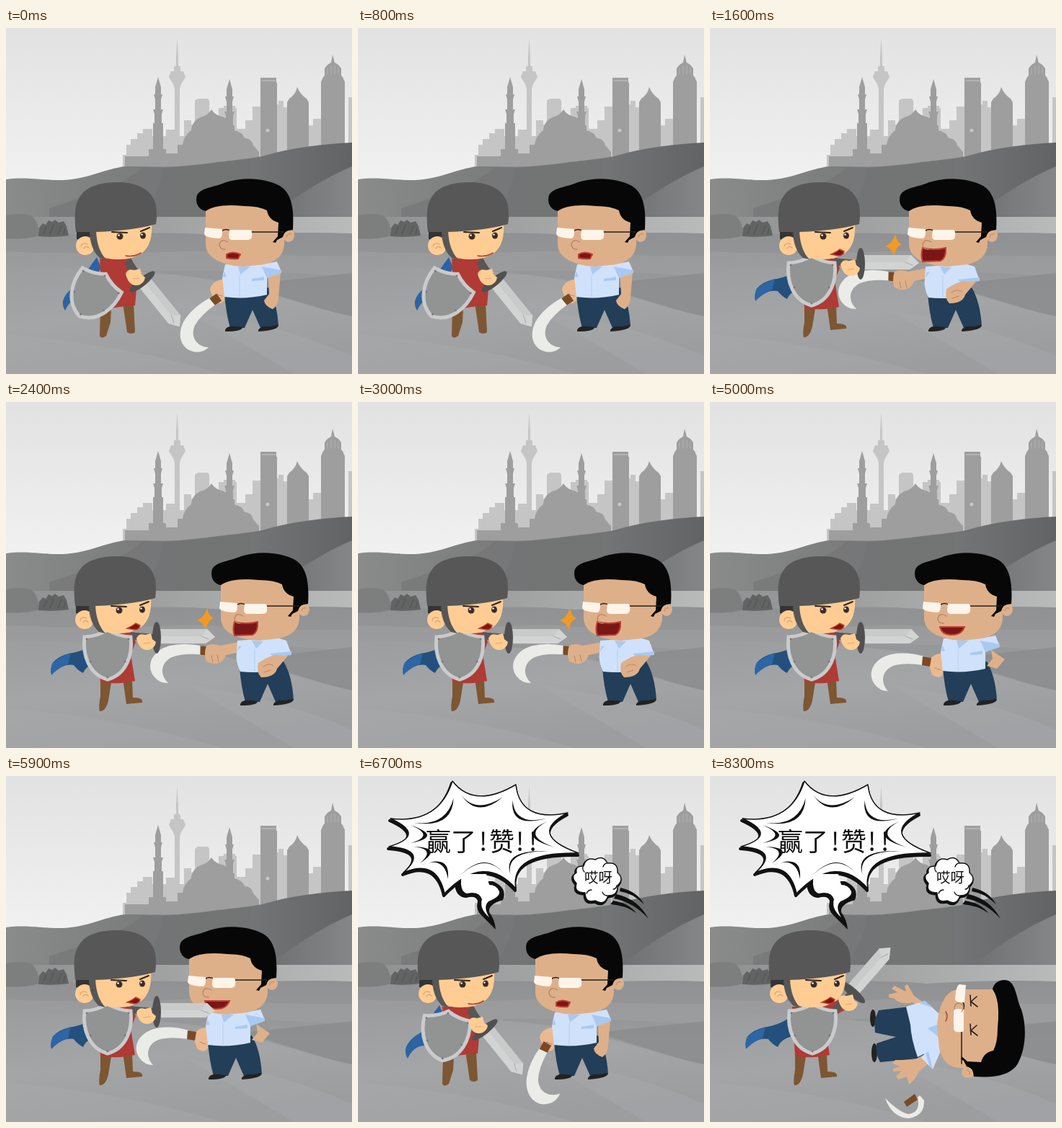
An HTML page for the animation above (8.5 s loop, 480 by 480 pixels).

```html
<!DOCTYPE html>
<html lang="zh">
<head>
<meta charset="utf-8">
<style>
html, body { margin: 0; width: 100%; height: 100%; overflow: hidden; background: #ececec; }
svg { display: block; width: 100vw; height: 100vh; }
text { font-family: "Noto Sans CJK SC", "Noto Sans CJK", sans-serif; font-weight: 500; fill: #111; }
</style>
</head>
<body>
<svg viewBox="0 0 480 480">
  <defs>
    <linearGradient id="sky" x2="0" y2="1"><stop stop-color="#e2e2e2"/><stop offset="1" stop-color="#f1f1f1"/></linearGradient>
    <linearGradient id="hill"><stop stop-color="#8a8b8b"/><stop offset=".35" stop-color="#7c7d7d"/><stop offset=".7" stop-color="#747576"/><stop offset="1" stop-color="#626364"/></linearGradient>
    <linearGradient id="slope"><stop stop-color="#6f7071"/><stop offset="1" stop-color="#858687"/></linearGradient>
    <linearGradient id="strip"><stop stop-color="#8e8f90"/><stop offset=".5" stop-color="#a2a3a3"/><stop offset="1" stop-color="#b9baba"/></linearGradient>
    <linearGradient id="field" x2="0" y2="1"><stop stop-color="#909192"/><stop offset=".5" stop-color="#9b9c9e"/><stop offset="1" stop-color="#848587"/></linearGradient>
    <linearGradient id="mound" x2=".4" y2="1"><stop stop-color="#9c9d9f"/><stop offset=".5" stop-color="#a4a5a7"/><stop offset="1" stop-color="#9c9d9f"/></linearGradient>
  </defs>
  <g id="scene"></g>
  <g id="man"></g>
  <g id="warrior"></g>
  <g id="bubbles"></g>
</svg>
<script>
const LOOP = 8500;
const layer = id => document.getElementById(id);
const p = (d, fill, extra = "") => `<path d="${d}" fill="${fill}" ${extra}/>`;
const line = (d, color, w = 1.5) => p(d, "none", `stroke="${color}" stroke-width="${w}" stroke-linecap="round" stroke-linejoin="round"`);
const oval = (x, y, rx, ry, fill) => `<ellipse cx="${x}" cy="${y}" rx="${rx}" ry="${ry}" fill="${fill}"/>`;
const group = (transform, ...parts) => `<g transform="${transform}">${parts.join("")}</g>`;
const move = (x, ...parts) => group(`translate(${x})`, ...parts);

const STEEL = "#575757", SKIN = "#ffcd93", RED = "#b03a35", BROWN = "#7d5632";
const TAN = "#deb08a", NAVY = "#223e58", SHIRT = "#d0e2fb", FOLD = "#a9c9f2", LENS = "#fdf4ea";

// ---------- scenery ----------
function minaret(x, top) {
  return p(`M${x} ${top}L${x + 4} ${top + 14}V${top + 24}H${x + 6}L${x + 4} ${top + 31}V${top + 45}H${x + 7}L${x + 5} ${top + 51}V${top + 64}H${x + 7}V${top + 125}H${x - 7}V${top + 64}H${x - 5}V${top + 51}L${x - 7} ${top + 45}H${x - 4}V${top + 31}L${x - 6} ${top + 24}H${x - 4}V${top + 14}Z`, "#9e9e9e");
}

function scenery() {
  const far = "#c5c5c5", near = "#9e9e9e";
  return `<rect width="480" height="215" fill="url(#sky)"/>` +
    p("M162 195V176H167V162H173V154H182V146H190V140H203V150H222V141H234V150H247V128H257V134H262V101L266 98H280L282 101V195Z", far) +
    p("M295 195V111H302V108H318V111H320V140H332V128H342V109H353V106H378V101H385V110H390V195ZM420 195V135H426V126H437V195ZM475 195V96H480V195Z", far) +
    p("M237.500 14L239 40V52L242 54V60H246L249 68L243 78L241 84V195H234V84L232 78L226 68L229 60H233V54L236 52V40Z", far) +
    p("M165 195V178H198V168H222V174H238V162H245Q246 150 257 142Q258 128 272 123Q280 121 285 113Q290 121 300 123Q314 128 316 142Q328 144 331 153Q340 152 343 163L351 172V195Z", near) +
    minaret(211, 68) + minaret(310, 71) +
    p("M353 195V69H375V76H376V195Z", near) + line("M355 73H374", "#c8c8c8", 1) + oval(363, 142, 2.5, 2.5, far) +
    p("M390 195V103L393 98Q402 92 404 82Q408 92 417 98L420 103V195Z", near) +
    p("M437 195V75L440 68L442 66V56L446 51L451 48L453 37L456 48L461 51L465 56V66L467 68L470 75V195Z", near) +
    line("M446 64V56M451 64V53M456 64V53M461 64V56", "#b3b3b3", 1) +
    p("M0 210C30 206 50 212 80 211C115 209 135 196 165 192C210 192 235 195 280 188C315 183 335 182 355 178C400 165 440 161 480 159V270H0Z", "url(#hill)") +
    p("M60 250C120 230 160 220 190 193C240 195 280 190 340 182V262H60Z", "#757677", 'opacity=".65"') +
    p("M190 263Q215 225 218 194L340 182V263Z", "#727374", 'opacity=".6"') +
    p("M364 262C400 235 440 209 480 192V264Z", "url(#slope)") +
    `<rect y="262" width="480" height="26" fill="url(#strip)"/>` +
    p("M0 286H130Q250 282 300 288Q400 282 480 285V480H0Z", "url(#field)") +
    p("M0 310Q140 316 260 309Q390 318 480 316V345Q300 330 0 342Z", "#a0a1a2", 'opacity=".6"') +
    p("M330 356L480 340V402Q390 375 330 356Z", "#898a8c", 'opacity=".7"') +
    p("M0 333C60 329 150 333 230 342C330 351 390 381 480 400V480H0Z", "url(#mound)") +
    p("M0 425Q170 440 300 480H0ZM250 392Q380 410 480 455V480H400Z", "#a7a8aa", 'opacity=".45"') +
    p("M0 260Q20 256 35 260Q46 270 46 288Q25 294 0 292Z", "#7d7e7e") +
    p("M45 289L46 277L51 271L55 273L59 267L64 269L68 266L73 270L80 268L84 275L87 288Q66 291 45 289Z", "#626363") +
    line("M52 285L56 276M61 286L66 273M72 286L77 274M80 286L82 278", "#4f5050", 1);
}

// ---------- warrior ----------
function shield(x, y, turn) {
  const d = "M0 -35Q-14 -26 -32 -25C-35 0 -26 27 0 34C26 27 35 0 32 -25Q14 -26 0 -35Z";
  const studs = [[0, -32], [-29, -22], [29, -22], [-24, 9], [24, 9], [0, 31]];
  return group(`translate(${x} ${y}) rotate(${turn})`,
    p(d, "#929493", 'stroke="#c9cbcc" stroke-width="5"'),
    ...studs.map(s => oval(s[0], s[1], 1.4, 1.4, "#777")));
}

function sword(x, y, turn) {
  return group(`translate(${x} ${y}) rotate(${turn})`,
    p("M-36 -8Q-20 -6 0 -5V4Q-20 4 -36 2Z", STEEL),
    p("M4 -12H70L81 -1L68 8H4Z", "#c9cbcb"),
    p("M4 -2H62L70 -12L81 -1L68 8H4Z", "#d2d3d3"),
    line("M62 -2L72 2", "#aaa", 1),
    oval(0, 0, 6, 22, "#505050"));
}

const fist = (x, y) => p(`M${x - 13} ${y - 4}Q${x - 10} ${y - 12} ${x - 1} ${y - 9}L${x + 7} ${y - 11}L${x + 9} ${y - 3}L${x + 14} ${y + 1}Q${x + 13} ${y + 10} ${x + 3} ${y + 12}Q${x - 9} ${y + 13} ${x - 13} ${y - 4}Z`, SKIN) +
  line(`M${x - 3} ${y + 3}L${x + 6} ${y + 2}`, "#dda56c", 1);

function warriorHead(shout) {
  return p("M98 280H124V298L98 293Z", "#343434") + oval(110, 302, 13, 13, SKIN) +
    line("M104 303Q105 297 113 300M108 306Q110 301 115 305", "#d69f68", 1.2) +
    p("M119 280L202 270Q204 299 190 311Q176 322 152 321Q126 320 119 298Z", SKIN) +
    p("M116 281H125Q126 308 139 321L130 319Q116 306 116 281Z", STEEL) +
    p("M97 283C95 262 94 245 104 232C113 219 133 214 155 214C182 214 203 224 208 246Q210 260 208 272Q166 284 97 283Z", STEEL) +
    line("M147 283L168 284M187 282L199 277", "#33241c", 2) +
    oval(158, 289, 4.5, 4.5, "#3b2c29") + oval(190, 288, 4, 4.5, "#3b2c29") +
    oval(156.5, 287.5, 1.3, 1.3, "#fff") + oval(188.500, 286.500, 1.2, 1.2, "#fff") +
    (shout ? p("M169 314Q176 311 181 307L187 310Q186 316 179 316Z", "#7c1717", 'stroke="#c9412f" stroke-width="1.5"')
           : line("M166 316Q178 318 187 312", "#b63f2c", 1.6));
}

function warrior(pose, x) {
  if (pose === "idle") {
    const back = x < 0;
    return move(x,
      p("M100 356Q82 366 79 379Q78 386 82 392Q90 374 106 374L132 333L126 318Q118 328 100 356Z", "#2b63a3"),
      p("M131 386L146 388L145 408L139 427Q132 432 130 427Z", BROWN),
      p("M162 381L177 382L179 422Q174 426 168 422Z", BROWN),
      p("M130 320L174 320L183 340L179 385Q158 386 134 391Z", RED),
      sword(189, 352, 51),
      shield(back ? 134 : 120, back ? 361 : 371, back ? 7 : 32),
      p("M165 327L178 330L182 340L172 342Z", STEEL),
      fist(179, 345),
      warriorHead(false));
  }
  const win = pose === "win", dx = win ? 14 : 0;
  return move(x,
    p("M130 330Q115 345 88 349Q72 353 66 362Q62 370 64 378Q80 362 95 365Q100 372 108 376Q114 362 135 360Z", "#23507d"),
    p("M91 348Q75 354 66 361Q62 369 64 379Q75 367 87 364Z", "#2d65a5"),
    p("M132 386L147 389L143 414Q139 430 131 429Q129 424 132 408Z", BROWN),
    p("M163 383L176 385L177 410Q192 410 190 417L168 419Z", BROWN),
    p("M128 320H176L181 333L174 350L180 387Q160 392 132 389Z", RED),
    win ? p("M170 320L194 310L202 324L178 337Z", RED) : "",
    win ? sword(212, 300, -49) : sword(210, 327, 0),
    shield(142 + dx, 351, 0),
    win ? fist(205, 314) : fist(195, 332),
    warriorHead(true));
}

// ---------- man ----------
const mouths = {
  idle: "M306 314Q314 309 325 314L322 320Q314 321 306 319Z",
  reach: "M299 312H333Q329 324 313 323Q301 322 299 312Z",
  strike: "M296 305Q312 309 328 305Q329 319 321 323L296 324Q293 315 296 305Z"
};

function glasses(dx = 0, dy = 0) {
  return group(`translate(${dx} ${dy})`,
    line("M300 281Q305 278 311 281M340 283L385 283", "#222", 1.5),
    p("M276 277L300 279Q301 291 296 292Q277 291 275 286Z", LENS),
    p("M310 280H339Q342 281 341 290Q340 294 334 294H314Q309 294 309 288Z", LENS));
}

const shutEyes = [0, 40].map(x => move(x, line("M285 285L300 284M287 276L294 284L301 275", "#2b211d", 1.6))).join("");

function manHead(pose) {
  const out = pose === "out";
  return oval(392, 288, 8, 9, TAN) + line("M389 290Q390 284 395 286", "#b98560", 1) +
    p("M277 244L378 246L386 283V300Q385 322 358 328L330 331Q303 330 287 319Q277 311 277 300Z", TAN) +
    p("M277 254C266 252 262 241 265 232C271 221 290 221 305 214C330 206 360 208 380 219C396 229 400 250 398 280L392 281Q386 282 384 290L376 294L374 298L370 297L377 289L378 270Q364 266 362 253Q351 247 330 247Q292 243 277 254Z", "#070707") +
    (out ? shutEyes + glasses(-5, 14) + line("M308 319Q314 315 321 319", "#9f4b38", 1.5)
         : glasses() + p(mouths[pose], "#7a1616", 'stroke="#bd4034" stroke-width="2"')) +
    line("M308 297Q299 291 296 300Q296 307 304 307", "#b98560", 1.3);
}

function sickle(x, y, turn) {
  return group(`translate(${x} ${y}) rotate(${turn})`,
    p("M-3 -6Q-28 -13 -48 -9C-72 -4 -83 16 -72 32Q-65 42 -53 42C-64 30 -62 14 -46 7Q-30 2 -5 6Z", "#ebebe8"),
    p("M-5 -6L7 -4L5 8L-6 6Z", "#7b4a25"));
}

const legs = p("M303 368L364 360Q376 380 378 414L353 416L342 391L331 416L311 416Q305 395 303 368Z", NAVY) +
  p("M304 419Q306 413 318 414L328 415Q328 421 304 421ZM350 419Q353 413 366 414L377 412Q380 419 350 421Z", "#222");

function manBody(pose, turn) {
  if (pose === "strike") {
    return legs + sickle(254, 344, -4) +
      p("M302 333L304 347L284 351Q280 364 266 363L257 360Q253 350 257 338Q265 334 276 338Z", TAN) +
      line("M264 352L266 361M272 351L274 360", "#b98560", 1) +
      p("M300 331L355 327L368 331L375 350L352 354L348 374Q322 376 304 374Q297 360 299 347Z", SHIRT) +
      p("M320 331L326 342L336 332ZM345 349L375 346V351L351 354ZM299 347L302 339L306 338Z", FOLD) +
      line("M324 343V373", "#b4cfee", 1) +
      p("M352 351L370 352L355 370Q352 382 333 382Q326 375 329 362Q340 354 352 351Z", TAN) +
      line("M336 367Q344 361 350 366M337 375L346 372", "#b98560", 1);
  }
  const reach = pose === "reach";
  return legs +
    (reach ? p("M370 344L389 357L378 370L364 366L372 356Z", TAN)
           : p("M364 346L381 338L378 374Q378 384 370 390Q359 386 358 378L365 369Z", TAN)) +
    p("M304 348Q285 350 283 363L288 378Q299 386 303 377Z", "#e9ba91") +
    sickle(reach ? 280 : 290, reach ? 359 : 376, turn) +
    line("M292 369L300 372", "#b98560", 1) +
    p("M304 328L360 327L376 324L382 338L362 347L362 370Q332 377 303 373L300 346Z", SHIRT) +
    p("M322 331L325 342L339 331ZM355 331L382 336V340L362 347ZM341 348L358 345V350L341 351ZM300 346L303 338L306 345Z", FOLD) +
    line("M324 343V373", "#b4cfee", 1);
}

const fallen =
  oval(226, 336, 4, 12, "#222") + oval(228, 384, 4, 13, "#222") +
  p("M294 318L234 325L228 340L229 356L258 362L231 371Q229 385 236 397L297 391Z", NAVY) +
  p("M299 316L283 305L274 289L270 291L272 299L256 291L252 295L260 300L248 303V307L256 309Q264 318 281 314L294 324Z", TAN) +
  p("M298 386L283 394L257 394L253 399L264 403L254 406V410L266 409L258 416L261 421L273 417L276 428Q286 420 289 411L306 396Z", TAN) +
  p("M272 320L298 312L318 330L319 384L309 407L293 391L298 385L288 390Q279 365 278 345Z", SHIRT) +
  p("M290 315L298 312L310 322ZM302 350L317 344V362ZM299 385L303 382L309 407L304 401Z", FOLD) +
  p("M243 447Q252 473 275 475Q298 472 297 450L291 443L288 446Q293 467 275 469Q262 466 243 447Z", "#ebebe8") +
  p("M269 452L284 441L288 449L273 459Z", "#7b4a25") +
  group("matrix(0 1 -1 0 646 19)", manHead("out"));

const spark = p("M258 286Q260 297 267 300Q258 304 256 317Q253 305 244 303Q254 299 258 286Z", "#f19a25");

function man(pose, x, turn) {
  if (pose === "out") return fallen;
  if (pose === "fall") return group(`translate(${x}) rotate(${turn} 340 418)`, manBody("idle", -70), manHead("idle"));
  return move(x, manBody(pose, turn), manHead(pose), pose === "strike" ? spark : "");
}

// ---------- speech ----------
const ink = 'stroke="#111" stroke-linejoin="round" stroke-width=';
// each spike tip, then the control point of the hollow after it
const spikes = [
  [131, 7, 161, 46], [219, 12, 225, 65], [291, 51, 234, 81], [306, 107, 210, 105], [219, 156, 175, 106],
  [120, 163, 109, 114], [63, 134, 99, 102], [43, 98, 96, 82], [45, 59, 112, 67]
];
const nextSpike = i => spikes[(i + 1) % spikes.length];
const burst = "M131 7" + spikes.map(([, , cx, cy], i) => `Q${cx} ${cy} ${nextSpike(i)[0]} ${nextSpike(i)[1]}`).join("") + "Z";

// tapered crescent that follows a hollow on its inner side
function crescent([x, y, cx, cy], i) {
  const [nx, ny] = nextSpike(i);
  const inner = (px, py, k) => `${175 + (px - 175) * k} ${90 + (py - 90) * k}`;
  const tip = (a, c) => a + (c - a) * 0.25;
  const from = inner(tip(x, cx), tip(y, cy), 0.87), to = inner(tip(nx, cx), tip(ny, cy), 0.87);
  return p(`M${from}Q${inner(cx, cy, 0.84)} ${to}Q${inner(cx, cy, 0.7)} ${from}Z`, "#111");
}

const shout =
  p(burst, "#111", `transform="translate(-1 3)" ${ink}"4"`) +
  p("M134 146Q134 168 150 169Q163 165 166 173Q163 187 172 194L191 213Q190 199 182 189Q180 178 201 172Q208 155 187 146Z", "#111") +
  p(burst, "#fff", ink + '"1.5"') +
  spikes.map(crescent).join("") +
  p("M144 136Q140 160 151 163Q168 159 172 171Q168 184 182 196Q173 181 181 174Q198 167 196 160Q192 151 182 151L178 136Z", "#fff") +
  `<text y="104" font-size="35" x="94 129 168 182 219 237">赢了!赞!!</text>`;
const cloud = "M313 125Q316 112 329 116Q340 109 346 121Q361 119 360 134Q370 143 360 152Q361 166 347 166Q342 181 329 173Q315 177 315 162Q299 162 303 149Q294 139 303 134Q301 124 313 125Z";
const sigh =
  p("M358 164Q388 170 403 198Q382 175 355 170ZM364 155Q387 160 397 178Q380 162 363 160ZM354 173Q375 176 386 190Q370 179 350 178Z", "#111") +
  p(cloud, "#111", `transform="translate(-1 2)" ${ink}"3"`) + p(cloud, "#fff", ink + '"1.5"') +
  line("M312 126Q311 130 314 133M345 121Q341 122 340 126M317 163Q319 158 324 158M346 166Q341 166 339 161M359 152Q358 157 354 157", "#111", 1.3) +
  `<text x="314" y="148" font-size="19.5">哎呀</text>`;

// ---------- timeline: start, warrior pose and x, man pose, x and angle ----------
const keys = `0 idle 0 idle 0 -44|200 idle 0 idle 0 -56|400 idle 0 idle 0 -44|600 idle 0 idle 0 -66|800 idle 0 idle 0 -44
1000 fight 0 reach 0 0|1200 fight 0 strike -1|1400 fight 0 reach 8 0|1600 fight 0 strike -1|1800 fight 0 reach 8 0
2000 idle 0 idle 21 -44|2200 fight 0 reach 10 0|2400 fight 0 strike 21|2500 fight -30 reach 21 0|2700 fight -59 strike 21
2900 fight -30 reach 30 0|3000 fight 0 strike 36|3100 fight 0 reach 36 0|3200 idle 0 idle 36 -44|3300 fight 0 reach 20 0
3400 fight 0 strike -1|3600 fight 0 reach 20 0|3800 fight 0 strike 56|4000 fight 0 reach 20 0|4200 fight 0 strike -1
4400 fight 0 reach 20 0|4500 fight 0 strike 36|4600 fight 0 reach 56 0|4800 fight 0 strike 36|5000 fight 0 reach 20 0
5200 fight 0 strike -1|5400 fight 0 reach -12 0|5600 fight 0 strike -12|5900 fight 0 reach -23 0|6100 idle -13 idle -31 -50
6500 idle -13 idle -31 -70|6900 idle -13 idle -31 -56|7100 idle -13 fall -31 12|7300 win -14 fall -31 35|7500 idle -13 fall -25 62
7700 win -14 out|7900 idle -13 out|8300 win -14 out`
  .split(/[|\n]/).map(row => row.trim().split(" ").map(v => isNaN(v) ? v : +v));

function draw(time) {
  const t = time % LOOP;
  const [, wPose, wx, mPose, mx = 0, turn = 0] = keys.filter(k => k[0] <= t).pop();
  layer("man").innerHTML = man(mPose, mx, turn);
  layer("warrior").innerHTML = warrior(wPose, wPose === "fight" ? wx - 1 : wx);
  const pop = t < 6500 ? "translate(175 100) scale(1.03) translate(-175 -100)" : "";
  layer("bubbles").innerHTML = (t >= 6300 ? group(pop, shout) : "") + (t >= 6500 ? sigh : "");
}

layer("scene").innerHTML = scenery();
const start = performance.now();
let last = -1;
function tick() {
  const time = performance.now() - start, step = Math.floor(time / 100);
  if (step !== last) draw(step * 100);
  last = step;
  requestAnimationFrame(tick);
}
tick();
</script>
</body>
</html>
```
